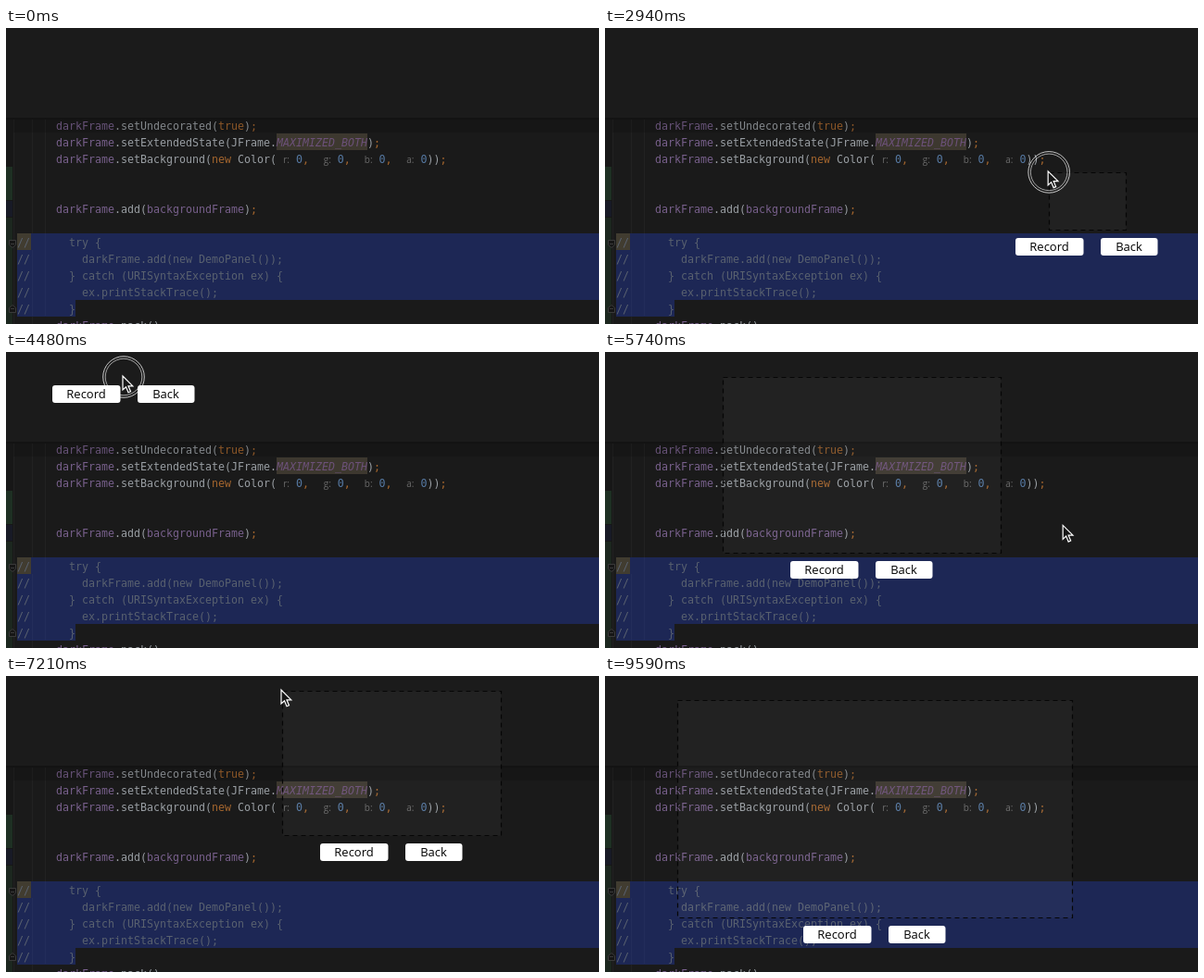
An HTML page for the animation above (9.66 s loop, 640x320 px).

```html
<!DOCTYPE html>
<html lang="en">
<head>
<meta charset="utf-8">
<title>Screen area picker</title>
<style>
  html, body { margin: 0; width: 100%; height: 100%; overflow: hidden; background: #1a1a1a; }
  svg { display: block; }
  text { white-space: pre; }
  .code { font: 11.63px "DejaVu Sans Mono", monospace; fill: #999ea3; }
  .v { fill: #78608c; }
  .k { fill: #a5662e; }
  .n { fill: #5679a3; }
  .c { fill: #59616f; }
  .i { fill: #6c5179; font-style: italic; }
  .hint { font: 10px "Open Sans", sans-serif; fill: #6a6a6a; text-anchor: end; }
  .label { font: 500 13px "Open Sans", sans-serif; fill: #000; text-anchor: middle; }
</style>
</head>
<body>
<svg width="640" height="320" viewBox="0 0 640 320">
  <rect width="640" height="320" fill="#1a1a1a"/>
  <rect y="98" width="8" height="222" fill="#171717"/>
  <rect y="150" width="7" height="36" fill="#1e3023"/>
  <rect y="187" width="7" height="17" fill="#181a26"/>
  <rect y="205" width="7" height="115" fill="#1c271f"/>
  <path d="M8.500 99V320M28.500 99V320M42.500 99V222" stroke="#222"/>
  <rect x="292" y="114" width="98" height="18" fill="#3d382f"/>
  <path d="M12 222H640V294H75V312H12Z" fill="#1d2755"/>
  <rect x="12" y="222" width="15" height="18" fill="#413c30"/>
  <path d="M28.500 240V311M42.500 222V311" stroke="#232d5a"/>
  <g fill="#161616" stroke="#3a3a3a">
    <path d="M3.500 229.500h7v5l-3.500 3l-3.500 -3zM5 233.500h4"/>
    <path d="M3.500 307.500h7v-5l-3.500 -3l-3.500 3zM5 303.500h4"/>
  </g>
  <g id="code" class="code"></g>
  <rect x="8" y="98" width="632" height="15" fill="#000" opacity=".15"/>
  <rect width="640" height="98" fill="#1b1b1b"/>
  <rect y="97" width="640" height="2" fill="#131313"/>

  <g id="picker">
    <rect id="area" fill="#fff" fill-opacity=".03" stroke="#060606" stroke-width="1.2" stroke-dasharray="5 4"/>
    <g id="buttons">
      <rect width="73.500" height="19" rx="3" fill="#fff"/>
      <rect x="92" width="61.500" height="19" rx="3" fill="#fff"/>
      <text class="label" x="36.500" y="14">Record</text>
      <text class="label" x="122.500" y="14">Back</text>
    </g>
  </g>
  <g id="pointer">
    <g id="ring" fill="none" stroke="#fff">
      <circle r="22.300" stroke-opacity=".75"/>
      <circle r="19.800" stroke-opacity=".6"/>
    </g>
    <path d="M-1 -1V14L2.500 10.800L5 16.800L7.500 15.700L5 9.800H9.800Z" fill="#161616" stroke="#fff" stroke-width="1.200"/>
  </g>
</svg>
<script>
const $ = id => document.getElementById(id);

// Source listing

const lines = `darkFrame.setUndecorated(true);
darkFrame.setExtendedState(JFrame.MAXIMIZED_BOTH);
darkFrame.setBackground(new Color(


darkFrame.add(backgroundFrame);

//      try {
//        darkFrame.add(new DemoPanel());
//      } catch (URISyntaxException ex) {
//        ex.printStackTrace();
//      }
darkFrame.pack();`.split("\n");

const tokens = { v: /darkFrame|backgroundFrame/, k: /true|new|[;,]/, n: /\d/, i: /MAXIMIZED_BOTH/ };
const tokenRule = new RegExp(
  Object.entries(tokens).map(([name, rule]) => `(?<${name}>${rule.source})`).join("|"), "g");

function highlight(text) {
  return text.replace(tokenRule, (token, ...rest) => {
    const groups = rest.pop();
    const name = Object.keys(groups).find(key => groups[key]);
    return `<tspan class="${name}">${token}</tspan>`;
  });
}

const baseline = row => 109.5 + 18 * row;

function lineMarkup(text, row) {
  return text.startsWith("//")
    ? `<text class="c" x="12" y="${baseline(row)}">${text}</text>`
    : `<text x="54" y="${baseline(row)}">${highlight(text)}</text>`;
}

function argMarkup(name, i) {
  const x = 313 + 44.8 * i, y = baseline(2);
  return `<text class="hint" x="${x - 7}" y="${y}">${name}:</text>
    <text x="${x}" y="${y}">${highlight(name === "a" ? "0));" : "0,")}</text>`;
}

$("code").innerHTML = lines.map(lineMarkup).join("") + [..."rgba"].map(argMarkup).join("");

// Motion

const LOOP = 9660, STEP = 70;
const SHOW = 70, HIDE = 9450;
const REST = 140;  // pointer stands still before the button is released
const enter = [190, 240], exit = [495, 330];

// wait: pause after release before the pointer moves on
const drags = [
  { down: 350, up: 1820, wait: 70, path: [[102, 122], [429, 278], [148, 122], [295, 216]] },
  { down: 2490, up: 3780, wait: 140, path: [[562, 218], [318, 35]] },
  { down: 4480, up: 5530, wait: 70, path: [[127, 27], [427, 217]] },
  { down: 6090, up: 7140, wait: 210, path: [[534, 172], [298, 16]] },
  { down: 7840, up: 8960, wait: 70, path: [[78, 26], [504, 261]] }
];

const smooth = u => u * u * (3 - 2 * u);
const easeOut = u => 1 - (1 - u) ** 2.5;
const progress = (t, from, to) => Math.min(Math.max((t - from) / (to - from), 0), 1);
const mix = (a, b, u) => a.map((v, i) => v + (b[i] - v) * u);

// Equal time for every leg of the drag
function dragPoint({ down, up, path }, t) {
  const legs = path.length - 1;
  const s = progress(t, down, up - REST) * legs;
  const leg = Math.min(Math.floor(s), legs - 1);
  return mix(path[leg], path[leg + 1], smooth(s - leg));
}

function pointerAt(t) {
  const i = drags.findLastIndex(d => d.down <= t);
  const drag = drags[i], next = drags[i + 1];
  if (drag && t < drag.up) return dragPoint(drag, t);
  const from = drag ? drag.path.at(-1) : enter;
  const start = drag ? drag.up + drag.wait : SHOW;
  const [to, end] = next ? [next.path[0], next.down - STEP] : [exit, HIDE];
  return mix(from, to, easeOut(progress(t, start, end)));
}

// Drawing

const [picker, area, buttons, pointer, ring] =
  ["picker", "area", "buttons", "pointer", "ring"].map($);

function show(el, on) {
  el.style.display = on ? "" : "none";
}

function moveTo(el, x, y) {
  el.setAttribute("transform", `translate(${x} ${y})`);
}

function drawArea(drag, t) {
  const [x0, y0] = drag.path[0];
  const [x1, y1] = dragPoint(drag, t).map(Math.round);
  const x = Math.min(x0, x1), y = Math.min(y0, y1);
  const width = Math.abs(x1 - x0), height = Math.abs(y1 - y0);
  const box = { x: x + 0.5, y: y + 0.5, width, height };
  for (const name in box) area.setAttribute(name, box[name]);
  moveTo(buttons, Math.floor(x + width / 2 - 77), y + height + 9);
}

function draw(t) {
  const drag = drags.findLast(d => d.down <= t);
  show(picker, drag);
  if (drag) drawArea(drag, t);
  show(ring, drag && t < drag.up);
  show(pointer, t >= SHOW && t < HIDE);
  moveTo(pointer, ...pointerAt(t));
}

const start = performance.now();

function tick() {
  const t = (performance.now() - start) % LOOP;
  draw(Math.floor(t / STEP) * STEP);
  requestAnimationFrame(tick);
}

tick();
</script>
</body>
</html>
```
